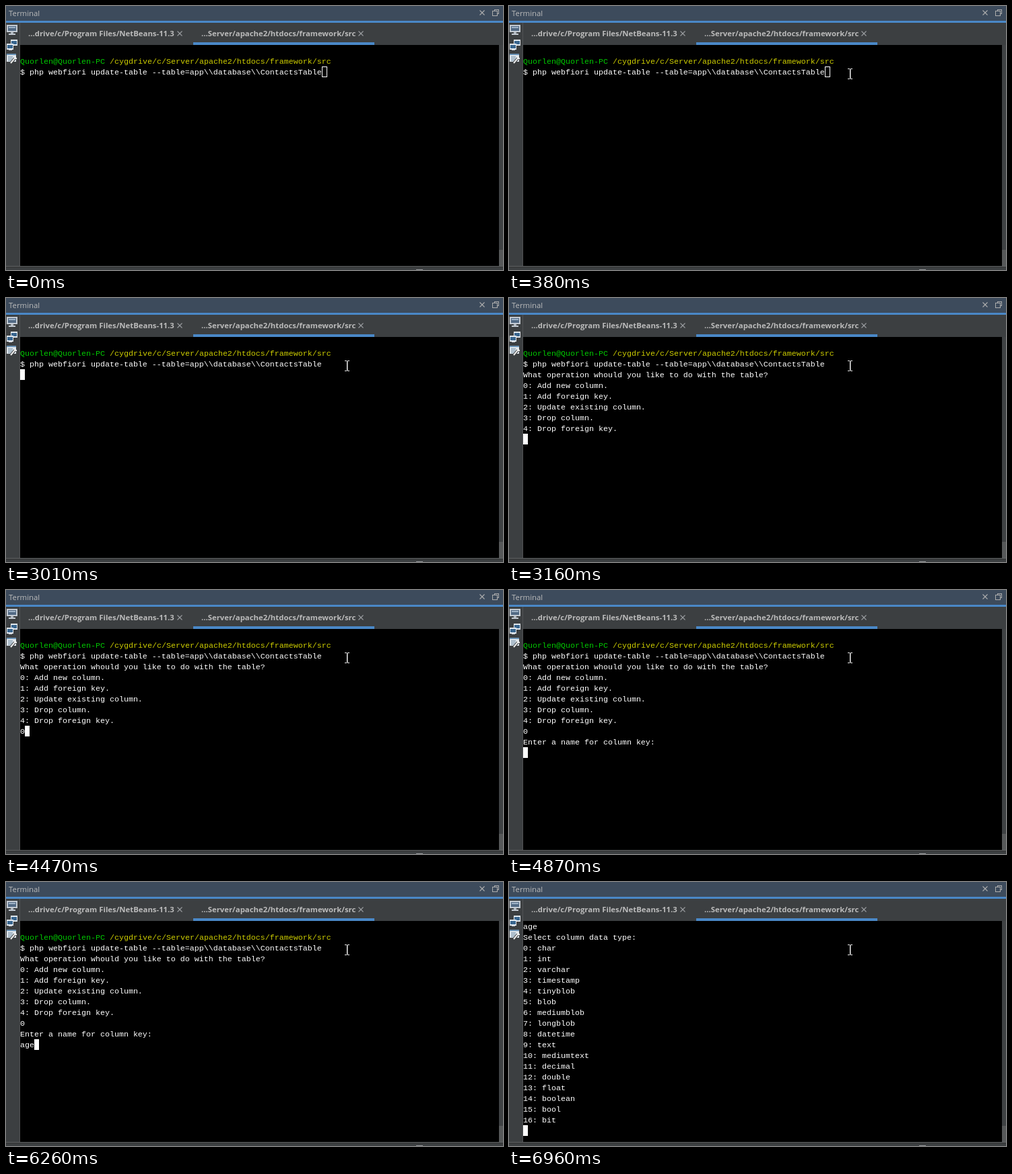
Animation, 738 px wide and 393 px high, one loop 8 s. Source, as an HTML page with a canvas:

```html
<!DOCTYPE html>
<html lang="en">
<head>
<meta charset="utf-8">
<title>Terminal</title>
<style>
html, body { margin: 0; width: 100%; height: 100%; overflow: hidden; background: #3c3f41; }
canvas { display: block; }
</style>
</head>
<body>
<canvas id="stage" width="738" height="393"></canvas>
<script>
const ctx = document.getElementById('stage').getContext('2d');
const LOOP = 8000;
const LEFT = 21, TOP = 58, CELL = 7, ROW = 16;
const MONO = '11.667px "Liberation Mono", monospace';
const UI = '11.4px "Open Sans", sans-serif';
const UI_BOLD = 'bold 11.35px "Open Sans", sans-serif';

const USER = 'Quorlen@Quorlen-PC';
const FOLDER = '/cygdrive/c/Server/apache2/htdocs/framework/src';
const COMMAND = '$ php webfiori update-table --table=app\\\\database\\\\ContactsTable';
const MENU = [
  'What operation whould you like to do with the table?',
  '0: Add new column.',
  '1: Add foreign key.',
  '2: Update existing column.',
  '3: Drop column.',
  '4: Drop foreign key.'
];
const TYPES = ('char int varchar timestamp tinyblob blob mediumblob longblob datetime ' +
  'text mediumtext decimal double float boolean bool bit').split(' ');

function rect(color, x, y, w, h) {
  ctx.fillStyle = color;
  ctx.fillRect(x, y, w, h);
}

function frame(color, x, y, w, h) {
  ctx.strokeStyle = color;
  ctx.lineWidth = 1;
  ctx.strokeRect(x + 0.5, y + 0.5, w - 1, h - 1);
}

function line(color, width, ...points) {
  ctx.strokeStyle = color;
  ctx.lineWidth = width;
  ctx.beginPath();
  points.forEach(([x, y]) => ctx.lineTo(x, y));
  ctx.stroke();
}

function text(value, x, y, font, color) {
  ctx.font = font;
  ctx.fillStyle = color;
  ctx.fillText(value, x, y);
}

function cross(x, y, size, color) {
  line(color, 1.1, [x, y], [x + size, y + size]);
  line(color, 1.1, [x + size, y], [x, y + size]);
}

function print(value, col, row, color = '#fff') {
  text(value, LEFT + col * CELL, TOP + row * ROW + 12, MONO, color);
}

function drawIcons() {
  // monitor
  rect('#c3cad2', 1, 28, 16, 11);
  rect('#526a85', 3, 30, 12, 7);
  rect('#9fb2c6', 4, 31, 10, 2);
  rect('#aeb5bc', 7, 39, 4, 2);
  rect('#c3cad2', 4, 41, 10, 2);
  // stacked windows
  for (const [x, y] of [[7, 50], [1, 56]]) {
    rect('#e2e8ee', x, y, 10, 9);
    rect('#39668f', x + 1, y + 2, 8, 5);
  }
  rect('#c3cad2', 4, 65, 5, 1);
  // list with wrench
  rect('#dfe6ec', 1, 71, 14, 12);
  rect('#6b94b8', 1, 71, 14, 2);
  for (let y = 75; y < 82; y += 2) rect('#7f99ae', 3, y, 7, 1);
  line('#3c3f41', 4, [7, 85], [14, 77]);
  line('#f0f0f0', 2, [7, 85], [13, 78], [13, 75]);
  line('#f0f0f0', 2, [13, 78], [16, 78]);
}

function drawWindow() {
  rect('#3c3f41', 0, 0, 738, 393);
  rect('#3d4b5c', 0, 0, 738, 22);
  rect('#4a88c7', 0, 22, 738, 3);
  text('Terminal', 4, 15, UI, '#bbbbbb');
  cross(703.5, 6.5, 7, '#adadad');
  frame('#adadad', 725, 5, 7, 7);
  rect('#3d4b5c', 722, 7, 8, 8);
  frame('#adadad', 722, 7, 8, 8);

  text('...drive/c/Program Files/NetBeans-11.3', 33, 45, UI_BOLD, '#bbbbbb');
  text('...Server/apache2/htdocs/framework/src', 290, 45, UI_BOLD, '#bbbbbb');
  cross(254.5, 37.5, 7, '#9b9da0');
  cross(523.5, 37.5, 7, '#9b9da0');
  rect('#4a88c7', 278, 54, 269, 4);

  rect('#515355', 20, 25, 1, 362);
  rect('#000', LEFT, TOP, 711, 329);
  rect('#3f4244', 732, TOP, 6, 329);
  rect('#565859', 732, 363, 6, 24);
  rect('#606365', 0, 387, 738, 1);
  rect('#323232', 0, 388, 738, 1);
  rect('#9b9da0', 609, 392, 10, 1);
  drawIcons();
}

function drawCaret(col, row, focused = true) {
  const x = LEFT + col * CELL, y = TOP + row * ROW;
  if (focused) rect('#fff', x, y, CELL, ROW);
  else frame('#fff', x, y, CELL + 1, ROW);
}

function drawSession(t) {
  if (t >= 6960) {
    print('age', 0, 0);
    print('Select column data type:', 0, 1);
    TYPES.forEach((type, i) => print(`${i}: ${type}`, 0, i + 2));
    drawCaret(0, 19);
    return;
  }
  print(USER, 0, 1, '#00c800');
  print(FOLDER, USER.length + 1, 1, '#cdcd00');
  print(COMMAND, 0, 2);
  if (t < 3010) return drawCaret(COMMAND.length, 2, t >= 670);
  if (t < 3160) return drawCaret(0, 3);

  MENU.forEach((item, i) => print(item, 0, i + 3));
  if (t >= 4470) print('0', 0, 9);
  if (t < 4870) return drawCaret(t >= 4470 ? 1 : 0, 9);

  print('Enter a name for column key:', 0, 10);
  const typed = 'age'.slice(0, [5570, 6030, 6260].filter(time => t >= time).length);
  print(typed, 0, 11);
  drawCaret(typed.length, 11);
}

function drawPointer(t) {
  if (t < 130) return;
  // the pointer is sampled about every 83 ms
  const step = Math.min(3, Math.floor((t - 130) / 83));
  const rest = (1 - step / 3) ** 1.5;
  const x = Math.round(503 + 127 * rest);
  const y = Math.round(93 + 274 * rest);

  if (t >= 600 && t < 750) {
    ctx.fillStyle = 'rgba(255, 255, 0, 0.47)';
    ctx.beginPath();
    ctx.arc(504, 100, 12, 0, Math.PI * 2);
    ctx.fill();
  }
  for (const serif of [y, y + 15]) {
    rect('#fff', x, serif, 3, 1);
    rect('#fff', x + 4, serif, 3, 1);
  }
  rect('#fff', x + 3, y + 1, 1, 14);
  rect('rgba(255, 255, 255, 0.4)', x + 4, y + 1, 1, 14);
}

function draw() {
  const t = performance.now() % LOOP;
  drawWindow();
  drawSession(t);
  drawPointer(t);
  requestAnimationFrame(draw);
}
draw();
</script>
</body>
</html>
```
